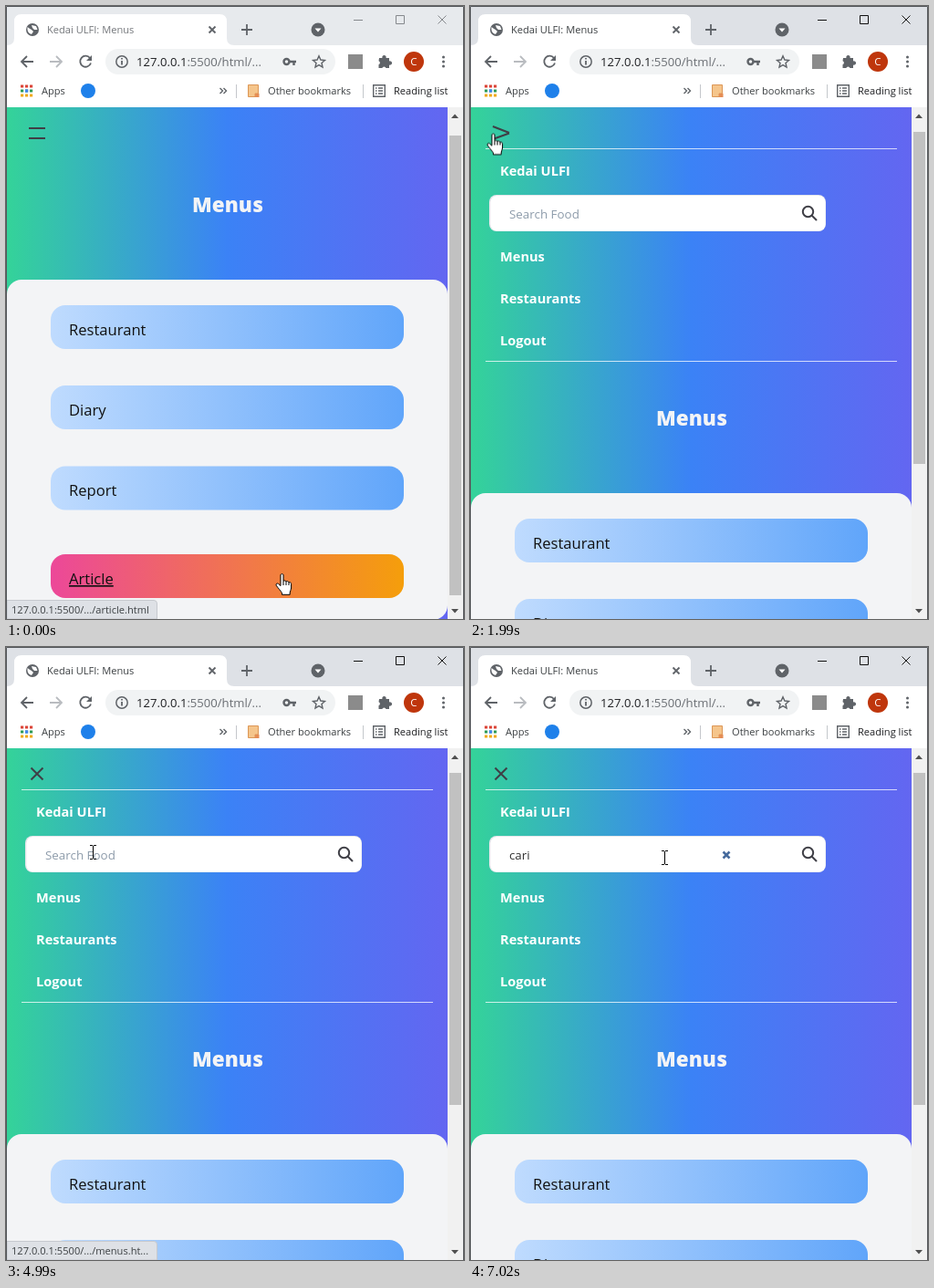
An HTML page for the animation above (7990 ms loop, 502 by 672 pixels).

```html
<!DOCTYPE html>
<html lang="en">
<head>
<meta charset="utf-8">
<title>Kedai ULFI: Menus</title>
<style>
html, body { margin: 0; width: 100%; height: 100%; overflow: hidden; background: #fff; }
svg { display: block; width: 100vw; height: 100vh; font-family: "Open Sans", "Noto Sans", sans-serif; }
.ui { font-size: 11.1px; fill: #3c4043; }
.url { font-size: 13.1px; fill: #6a6e73; }
.item { font-size: 16.6px; fill: #111; }
.nav { font-size: 14.6px; font-weight: 700; fill: #fff; }
.field { font-size: 13.4px; }
.line { fill: none; stroke: #5f6368; stroke-width: 1.8; }
.ink { fill: none; stroke: #3f3f46; stroke-width: 2; }

/* Steps begin at 0, 1000, 1990, 3000, 4030, 4990, 5990 and 7020 ms */
.v, .page, .thumb, .beam { animation: 7990ms step-end infinite; }
.v { opacity: 0; }
.idle { animation-name: idle; }
.open { animation-name: open; }
.hot { animation-name: hot; }
.cool { animation-name: cool; }
.arrow { animation-name: arrow; }
.turn { animation-name: turn; }
.cross { animation-name: cross; }
.hint { animation-name: hint; }
.visit { animation-name: visit; }
.calm { animation-name: calm; }
.menus { animation-name: menus; }
.typing { animation-name: typing; }
.typed { animation-name: typed; }
.query { animation-name: query; }
.link { animation-name: link; }
.bubble { animation-name: bubble; }
.page { animation-name: page; }
.thumb { animation-name: thumb; }
.beam { animation-name: beam; }
@keyframes idle { 0% { opacity: 1 } 24.906%, 100% { opacity: 0 } }
@keyframes open { 0% { opacity: 0 } 24.906%, 100% { opacity: 1 } }
@keyframes hot { 0% { opacity: 1 } 12.516%, 100% { opacity: 0 } }
@keyframes cool { 0% { opacity: 0 } 12.516%, 100% { opacity: 1 } }
@keyframes arrow { 0% { opacity: 0 } 12.516% { opacity: 1 } 24.906%, 100% { opacity: 0 } }
@keyframes turn { 0% { opacity: 0 } 24.906% { opacity: 1 } 37.547%, 100% { opacity: 0 } }
@keyframes cross { 0% { opacity: 0 } 37.547%, 100% { opacity: 1 } }
@keyframes hint { 0% { opacity: 1 } 74.969%, 100% { opacity: 0 } }
@keyframes visit { 0% { opacity: 0 } 50.438% { opacity: 1 } 62.453%, 100% { opacity: 0 } }
@keyframes calm { 0% { opacity: 1 } 50.438% { opacity: 0 } 62.453%, 100% { opacity: 1 } }
@keyframes menus { 0% { opacity: 0 } 62.453% { opacity: 1 } 74.969%, 100% { opacity: 0 } }
@keyframes typing { 0% { opacity: 0 } 74.969% { opacity: 1 } 87.860%, 100% { opacity: 0 } }
@keyframes typed { 0% { opacity: 0 } 87.860%, 100% { opacity: 1 } }
@keyframes query { 0% { opacity: 0 } 74.969%, 100% { opacity: 1 } }
@keyframes link { 0% { opacity: 0 } 12.516% { opacity: 1 } 24.906% { opacity: 0 } 50.438% { opacity: 1 } 62.453%, 100% { opacity: 0 } }
@keyframes bubble { 0% { opacity: 1 } 24.906% { opacity: 0 } 50.438% { opacity: 1 } 74.969%, 100% { opacity: 0 } }
@keyframes page { 0% { transform: translateY(0) } 24.906%, 100% { transform: translateY(234px) } }
@keyframes thumb { 0% { transform: translateY(142px) scaleY(504) } 24.906%, 100% { transform: translateY(138px) scaleY(364) } }
@keyframes beam {
  0% { transform: translate(60px, 212px); opacity: 0 }
  37.547% { transform: translate(60px, 212px); opacity: 1 }
  50.438% { transform: translate(92px, 217px); opacity: 0 }
  62.453% { transform: translate(92px, 217px); opacity: 1 }
  87.860%, 100% { transform: translate(210px, 223px); opacity: 1 }
}
</style>
</head>
<body>
<svg viewBox="0 0 502 672" preserveAspectRatio="none">
  <defs>
    <linearGradient id="sky" gradientUnits="userSpaceOnUse" x1="1" x2="484">
      <stop stop-color="#34d399"/><stop offset=".5" stop-color="#3b82f6"/><stop offset="1" stop-color="#6366f1"/>
    </linearGradient>
    <linearGradient id="blue"><stop stop-color="#bfdbfe"/><stop offset="1" stop-color="#60a5fa"/></linearGradient>
    <linearGradient id="warm"><stop stop-color="#ec4899"/><stop offset="1" stop-color="#f59e0b"/></linearGradient>
    <clipPath id="view"><path d="M1 111H484V672H1z"/></clipPath>
    <rect id="btn" x="49" width="387" height="48" rx="16"/>
    <path id="hand" d="M6 1.8C6 .2 9 .2 9 1.8V8.5C9.6 7.5 11.8 7.8 12 9C12.8 8.2 14.8 8.6 15 10C16 9.4 17.6 10 17.6 11.5V16C17.6 18 16.4 19 16.2 21V23.3H7.5V21.5C6 19 3.5 16.5 1.2 13.2C.4 11.6 2.2 10.4 3.6 11.4L6 13.6zM9 8.5V13M12 9V13M15 10V13" fill="#fff" stroke="#000"/>
    <path id="controls" d="M381 15.5H391M427.500 10.500H436.500V19.500H427.500zM473.500 10.500L482.500 19.500M482.500 10.500L473.500 19.500" fill="none"/>
  </defs>

  <!-- Tab strip -->
  <rect width="502" height="672" fill="#fff"/>
  <rect width="502" height="43" fill="#dee1e6"/>
  <rect class="v idle" width="502" height="43" fill="#e7eaed"/>
  <path d="M1 43Q9 43 9 35V17Q9 9 17 9H234Q242 9 242 17V35Q242 43 250 43z" fill="#fff"/>
  <circle cx="29" cy="26" r="7" fill="#5f6368"/>
  <path d="M23.500 23Q26 25 28 26L30 28L28 31Q24 30 23.500 26zM28 21L33 22L34.500 26L31 26L29 24z" fill="#fff"/>
  <text class="ui v idle" x="45" y="30" style="fill:#74777b">Kedai ULFI: Menus</text>
  <text class="ui v open" x="45" y="30">Kedai ULFI: Menus</text>
  <path class="line" d="M222.500 22.500L229.500 29.500M229.500 22.500L222.500 29.500M258 26H270M264 20V32"/>
  <circle cx="342" cy="26" r="7.5" fill="#5f6368"/>
  <path d="M338.500 24.500H345.500L342 28.500z" fill="#fff"/>
  <use class="v idle" href="#controls" stroke="#85888c"/>
  <use class="v open" href="#controls" stroke="#111"/>

  <!-- Toolbar -->
  <path class="line" d="M30 61H17M23 55L17 61L23 67"/>
  <path class="line" d="M48 61H61M55 55L61 61L55 67" style="stroke:#b9bcc0"/>
  <path class="line" d="M92 57A6 6 0 1 0 93 62.500"/>
  <path d="M94 54V60H88z" fill="#5f6368"/>
  <rect x="109" y="47" width="252" height="28" rx="14" fill="#f1f3f4"/>
  <circle class="line" cx="127" cy="61" r="6.200" style="stroke-width:1.5"/>
  <path class="line" d="M127 60V64.500M127 57V58.600"/>
  <text class="url" x="143" y="66"><tspan fill="#202124">127.0.0.1</tspan>:5500/html/...</text>
  <circle class="line" cx="307.500" cy="61" r="3" style="stroke-width:2.4"/>
  <path class="line" d="M311 61H318M315.500 61V65" style="stroke-width:2.4"/>
  <path class="line" d="M343 54.800L344.900 59L349.500 59.500L346 62.500L347 67L343 64.600L339 67L340 62.500L336.500 59.500L341.100 59z" style="stroke-width:1.4"/>
  <rect x="375" y="53" width="16" height="16" fill="#8b8b8b"/>
  <path d="M409 57H412.500A2.200 2.200 0 1 1 416.500 57H420V60.500A2.200 2.200 0 1 1 420 64.500V68H416.500A2.200 2.200 0 0 0 412.300 68H408.500V64.300A2.200 2.200 0 0 0 408.500 60.200z" fill="#5f6368"/>
  <circle cx="447" cy="61" r="11" fill="#bf360c"/>
  <text x="447" y="65" text-anchor="middle" font-size="11.5" fill="#fff">C</text>
  <g fill="#5f6368"><circle cx="479.500" cy="56" r="1.500"/><circle cx="479.500" cy="61" r="1.500"/><circle cx="479.500" cy="66" r="1.500"/></g>

  <!-- Bookmarks -->
  <g fill="none" stroke-width="3.200" stroke-dasharray="3.200 1.800">
    <path d="M16 88H29.500" stroke="#db4437"/>
    <path d="M16 93H29.500" stroke="#2f9b57"/>
    <path d="M16 98H29.500" stroke="#f0a91c"/>
  </g>
  <path d="M21 91.400H24.200V94.600H21z" fill="#4285f4"/>
  <text class="ui" x="39" y="97">Apps</text>
  <circle cx="90" cy="93" r="8" fill="#1e80ea"/>
  <path class="line" d="M234.500 90L237.500 93L234.500 96M238.500 90L241.500 93L238.500 96" style="stroke-width:1.4"/>
  <path d="M252.500 86V101M391.500 86V101" stroke="#c4c7cb"/>
  <path d="M265.500 86.500H276.500V96H273V99.500H265.500z" fill="#f5c58b" stroke="#dc9656"/>
  <path d="M273 96H277.500V100H273z" fill="#e58d55"/>
  <text class="ui" x="287" y="97">Other bookmarks</text>
  <path class="line" d="M402.700 86.700H415.300V99.300H402.700zM405 90H406.500M408 90H413M405 93H406.500M408 93H413M405 96H406.500M408 96H413" style="stroke-width:1.4"/>
  <text class="ui" x="425" y="97" style="fill:#202124">Reading list</text>

  <!-- Page -->
  <g clip-path="url(#view)">
    <rect x="1" y="111" width="483" height="561" fill="url(#sky)"/>
    <g class="page">
      <text x="243" y="226" text-anchor="middle" font-size="22.500" font-weight="800" fill="#f3f4f6">Menus</text>
      <rect x="1" y="300" width="483" height="373" rx="16" fill="#f3f4f6"/>
      <g fill="url(#blue)">
        <use href="#btn" y="328"/><use href="#btn" y="416"/><use href="#btn" y="504.500"/>
        <use class="v cool" href="#btn" y="593"/>
      </g>
      <g class="item">
        <text x="69" y="361">Restaurant</text>
        <text x="69" y="449">Diary</text>
        <text x="69" y="537">Report</text>
        <text class="v cool" x="69" y="626">Article</text>
      </g>
      <g class="v hot">
        <use href="#btn" y="601" fill="url(#warm)"/>
        <text class="item" x="69" y="634" text-decoration="underline">Article</text>
      </g>
    </g>

    <path class="ink v idle" d="M25 134H43M25 145H43"/>
    <path class="ink v turn" d="M25 132L43 139M25 146L43 139.500"/>
    <path class="ink v cross" d="M27.500 132.500L40.500 145.500M40.500 132.500L27.500 145.500"/>

    <g class="v open">
      <path d="M17 156.500H468M17 389.500H468" stroke="#fff" stroke-opacity=".75"/>
      <rect x="21" y="207" width="369" height="40" rx="8" fill="#e5e7eb"/>
      <rect x="22.500" y="208" width="367" height="38.500" rx="7" fill="#fff"/>
      <circle class="ink" cx="370.500" cy="225.500" r="5.700"/>
      <path class="ink" d="M374.500 229.500L380 235"/>
      <g class="nav">
        <text x="33" y="186">Kedai ULFI</text>
        <text x="33" y="280">Menus</text>
        <text class="v calm" x="33" y="326">Restaurants</text>
        <text class="v visit" x="33" y="326" style="fill:#1f2937">Restaurants</text>
        <text x="33" y="372">Logout</text>
      </g>
      <g class="field">
        <text class="v hint" x="43" y="233" fill="#8d9baa">Search Food</text>
        <g class="v typing">
          <text x="43" y="233" fill="#333">car</text>
          <path d="M63.500 218V238" stroke="#222"/>
        </g>
        <text class="v typed" x="43" y="233" fill="#333">cari</text>
        <path class="v query" d="M277.500 224.500L284.500 231.500M284.500 224.500L277.500 231.500" stroke="#466a9c" stroke-width="2.600"/>
      </g>
    </g>
  </g>

  <!-- Scrollbar -->
  <rect x="484" y="111" width="17" height="561" fill="#f1f1f1"/>
  <rect class="thumb" x="486" width="13" height="1" fill="#c1c1c1"/>
  <path d="M488 123H496L492 118.500zM488 661H496L492 665.500z" fill="#505050"/>

  <!-- Status bubble -->
  <g class="v bubble">
    <path d="M1 651.500H162Q165.500 651.500 165.500 655V672H1z" fill="#dee1e6" stroke="#c6c9ce"/>
    <g class="ui">
      <text class="v hot" x="6" y="666">127.0.0.1:5500/.../article.html</text>
      <text class="v link" x="6" y="666">127.0.0.1:5500/.../restauran...</text>
      <text class="v menus" x="6" y="666">127.0.0.1:5500/.../menus.ht...</text>
    </g>
  </g>
  <path d="M.5 672V.5H501.500V672" fill="none" stroke="#55585c"/>

  <!-- Pointers -->
  <use class="v hot" href="#hand" x="295" y="622"/>
  <path class="v arrow" d="M198 323V339.500L201.800 336L204.500 342L207 341L204.300 335H209z" fill="#fff" stroke="#000"/>
  <use class="v turn" href="#hand" x="18" y="139.500"/>
  <use class="v visit" href="#hand" x="47" y="328"/>
  <path class="beam" d="M0 .5H3M4 .5H7M3.500 1V15M0 15.500H3M4 15.500H7" fill="none" stroke="#000"/>
</svg>
</body>
</html>
```
